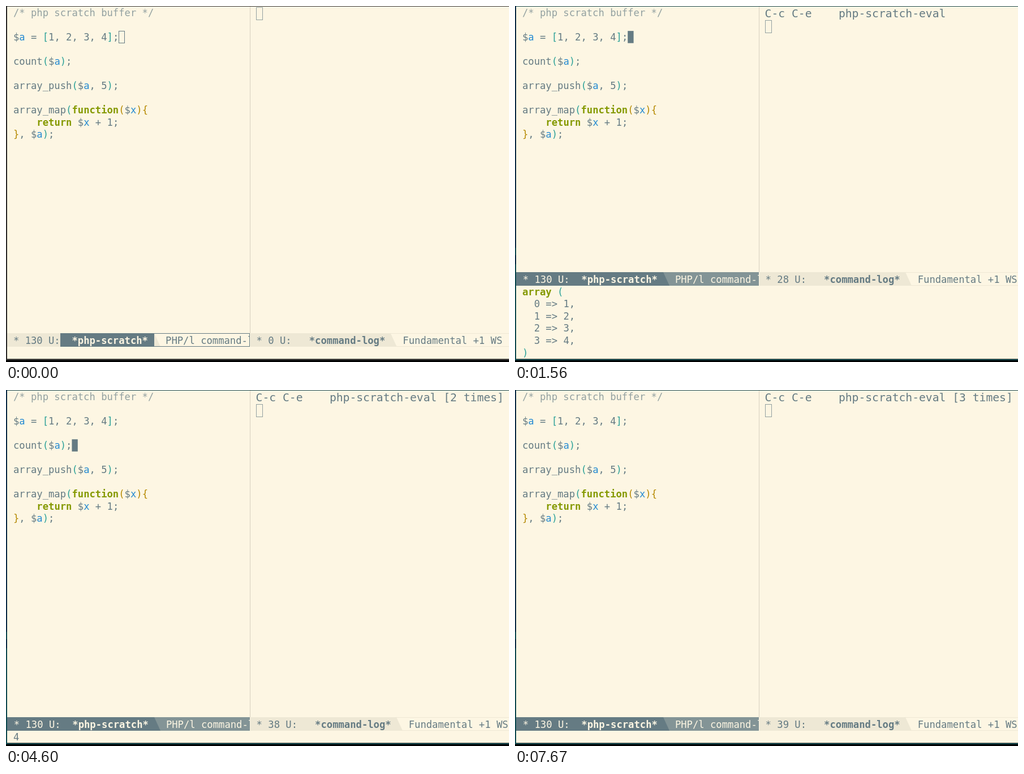
Animation of 889 by 630 pixels, one loop 8 s. Source, as an HTML page with a canvas:

```html
<!DOCTYPE html>
<html lang="en">
<head>
<meta charset="utf-8">
<title>PHP scratch buffer</title>
<style>
  html, body { margin: 0; width: 100%; height: 100%; overflow: hidden; background: #000; }
  canvas { display: block; }
</style>
</head>
<body>
<canvas id="stage" width="889" height="630"></canvas>
<script>
const ctx = document.getElementById('stage').getContext('2d');
const LOOP = 8000;
const CREAM = '#fdf6e3', SAND = '#eee8d5', SLATE = '#657b83', GREY = '#839496',
      PALE = '#93a1a1', GREEN = '#859900', BLUE = '#268bd2', CYAN = '#2aa198',
      YELLOW = '#b58900', PINK = '#d619bd';

// Text grid of the code pane and of the larger log pane
const X = 12.94, W = 10.35, LINE = 21.56, BASE = 16.8, SIZE = W / 0.602;
const LOG_X = 441.6, LOG_W = 11.85, LOG_LINE = 23.7, LOG_SIZE = LOG_W / 0.602;

const CODE = [
  '/* php scratch buffer */', '',
  '$a = [1, 2, 3, 4];', '',
  'count($a);', '',
  'array_push($a, 5);', '',
  'array_map(function($x){',
  '    return $x + 1;',
  '}, $a);'
];
const ARRAY = ['array (', '  0 => 1,', '  1 => 2,', '  2 => 3,', '  3 => 4,', ')'];

// [start, column, row, look]
const CURSOR = [
  [0, 18, 2, 'hollow'], [440, 18, 2, 'solid'], [870, 18, 2, ''], [1370, 18, 2, 'solid'],
  [2000, 18, 2, ''], [2500, 18, 2, 'solid'], [2670, 0, 3, 'solid'], [3030, 10, 4, 'solid'],
  [4100, 10, 4, ''], [4600, 10, 4, 'solid'], [5090, 0, 5, 'solid'], [5230, 10, 6, 'solid'],
  [5730, 10, 6, ''], [6230, 10, 6, 'solid'], [6870, 0, 5, 'solid'], [7170, 10, 4, 'solid'],
  [7670, 10, 4, '']
];
// [start, lines]
const ECHO = [[0, []], [1560, ARRAY], [2720, []], [3650, ['4']], [5090, []], [6430, ['5']], [6870, []]];
// [start, text, buffer size]
const COMMAND = 'C-c C-e    php-scratch-eval';
const LOG = [[0, '', 0], [1560, COMMAND, 28], [3650, COMMAND + ' [2 times]', 38],
             [6430, COMMAND + ' [3 times]', 39]];

const at = (track, t) => track.findLast(key => key[0] <= t);

function rect(x, y, w, h, color) {
  ctx.fillStyle = color;
  ctx.fillRect(x, y, w, h);
}

function outline(x, y, w, h, color) {
  ctx.strokeStyle = color;
  ctx.lineWidth = 1;
  ctx.strokeRect(x + 0.5, y + 0.5, w - 1, h - 1);
}

function text(str, x, y, color, bold = false, size = SIZE) {
  ctx.font = `${bold ? 'bold ' : ''}${size}px "DejaVu Sans Mono", monospace`;
  ctx.fillStyle = color;
  ctx.fillText(str, x, y);
}

// Brackets take their colour from the nesting depth
function code(lines, top, pairLit) {
  let depth = 0;
  const level = () => depth > 1 ? YELLOW : CYAN;
  lines.forEach((line, row) => {
    const y = top + row * LINE + BASE;
    if (line.startsWith('/*')) return text(line, X, y, PALE);
    for (const { 0: token, index } of line.matchAll(/\w+|[^\w\s]/g)) {
      let color = SLATE, bold = false;
      if (/^(function|return|array)$/.test(token)) [color, bold] = [GREEN, true];
      else if (line[index - 1] === '$') color = BLUE;
      else if (/[(\[{]/.test(token)) { depth++; color = level(); }
      else if (/[)\]}]/.test(token)) { color = level(); depth--; }
      if (pairLit && row === 6 && /[()]/.test(token)) [color, bold] = [PINK, true];
      text(token, X + index * W, y, color, bold);
    }
  });
}

function slanted(x, y, right, color) {
  ctx.fillStyle = color;
  ctx.beginPath();
  ctx.moveTo(x, y);
  ctx.lineTo(right, y);
  ctx.lineTo(right + 11, y + 24);
  ctx.lineTo(x, y + 24);
  ctx.fill();
}

function leftBar(y, active) {
  const base = y + 19, x = active ? 13.8 : X;
  const ink = active ? CREAM : SLATE;
  ctx.save();
  ctx.beginPath();
  ctx.rect(2, y, 429, 24);
  ctx.clip();
  rect(2, y, 429, 24, active ? GREY : CREAM);
  slanted(2, y, 262, active ? SLATE : SAND);
  if (!active) {
    rect(96, y, 166, 24, SLATE);
    outline(261, y, 170, 24, SLATE);
  }
  text('* 130 U:', x, base, ink);
  text('*php-scratch*', x + 10 * W, base, CREAM, true);
  text('PHP/l command-log', x + 26 * W, base, ink);
  ctx.restore();
}

function rightBar(y, size) {
  const base = y + 19, x = 442.6;
  const head = `* ${size} U:`;
  const name = x + (head.length + 3) * W;
  rect(432, y, 457, 24, CREAM);
  rect(432, y, 457, 1, SAND);
  rect(432, y + 23, 457, 1, SAND);
  slanted(432, y, name + 14 * W - 1, SAND);
  text(head, x, base, SLATE);
  text('*command-log*', name, base, SLATE, true);
  text('Fundamental +1 WS', name + 16 * W, base, SLATE);
}

function frameEdge(focused) {
  rect(0, 624.5, 889, 5.5, '#000');
  rect(0, 625, 889, 2, focused ? '#0c4147' : '#2b2b2b');
  rect(0, 0, 889, 1, focused ? '#1d4a50' : '#3a3a3a');
  rect(0, 0, 2, 627, focused ? '#0f4a50' : '#2b2b2b');
  if (focused) {
    rect(0, 0, 2, 428, '#0b2b45');
    rect(0, 441, 2, 16, '#0b2b45');
  }
}

function drawCursor([, col, row, look], pairLit) {
  const x = X + col * W, y = 1 + row * LINE;
  if (look === 'hollow') outline(Math.round(x), Math.round(y), 11, 22, SLATE);
  if (look !== 'solid') return;
  rect(x, y, W, LINE, SLATE);
  text(CODE[row][col] || '', x, y + BASE, CREAM, pairLit);
}

function draw(t) {
  const [, echo] = at(ECHO, t);
  const [, log, size] = at(LOG, t);
  const pairLit = t >= 5360 && t < 7000;
  const echoTop = 602.8 - Math.max(0, echo.length - 1) * LINE;
  const barY = Math.round(echoTop - 24.3);

  rect(0, 0, 889, 630, CREAM);
  code(CODE, 1, pairLit);
  drawCursor(at(CURSOR, t), pairLit);

  rect(431, 0, 1, barY, '#d6d0c0');
  text(log, LOG_X, 19.8, SLATE, false, LOG_SIZE);
  outline(442, Math.round(1.5 + (log ? LOG_LINE : 0)), 12, 23, PALE);

  leftBar(barY, t >= 440);
  rightBar(barY, size);
  code(echo, echoTop, false);
  frameEdge(t >= 310);
}

function tick(now) {
  draw(now % LOOP);
  requestAnimationFrame(tick);
}
requestAnimationFrame(tick);
</script>
</body>
</html>
```
